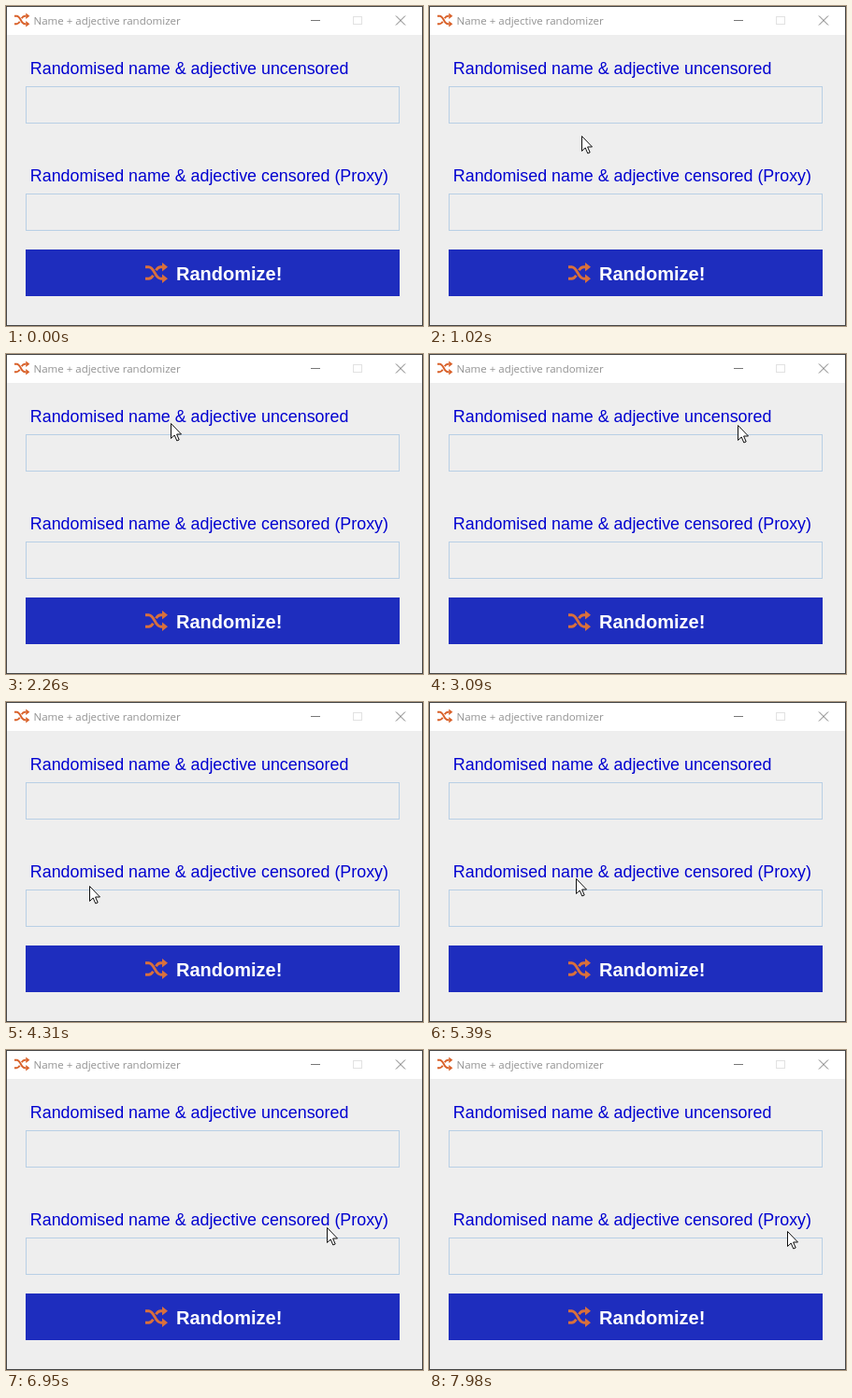
An HTML page for the animation above (8000 ms loop, 446 by 343 pixels).

```html
<!DOCTYPE html>
<html lang="en">
<head>
<meta charset="utf-8">
<title>Name + adjective randomizer</title>
<style>
  html, body { margin: 0; width: 100%; height: 100%; overflow: hidden; background: #eee; }
  svg { display: block; }
  .title { font: 11.5px "Open Sans", "Noto Sans", sans-serif; fill: #929292; }
  .label { font: 17.88px "Liberation Sans", Arial, sans-serif; fill: #0000d0; }
  .button { font: bold 20px "Liberation Sans", Arial, sans-serif; fill: #fff; }
  .field { fill: #eee; stroke: #b8cfe5; }
  .line { fill: none; stroke: #777; }
  .off { stroke: #e2e2e2; }
</style>
</head>
<body>
<svg width="446" height="343" viewBox="0 0 446 343">
  <defs>
    <g id="shuffle">
      <g fill="none" stroke="currentColor" stroke-width="2.9">
        <path d="M0 5H3.5C10 5 10 17.5 16.5 17.5H18"/>
        <path d="M0 17.5H3.5C5.8 17.5 7.2 16 8.4 14"/>
        <path d="M11.4 8.6C12.7 6.4 14.2 5 16.5 5H18"/>
      </g>
      <path fill="currentColor" d="M18 .3L24 5L18 9.7ZM18 12.8L24 17.5L18 22.2Z"/>
    </g>
  </defs>

  <rect width="446" height="343" fill="#eee"/>
  <rect width="446" height="31" fill="#fff"/>
  <use href="#shuffle" transform="translate(9 7.3) scale(.68)" color="#d9622b"/>
  <text class="title" x="29.5" y="20">Name + adjective randomizer</text>
  <path class="line" d="M326 15.5H336"/>
  <rect class="line off" x="371.5" y="11.5" width="9" height="8"/>
  <path class="line" d="M417 10.5L427 20.5M427 10.5L417 20.5"/>

  <text class="label" x="25.8" y="73">Randomised name &amp; adjective uncensored</text>
  <rect class="field" x="21.5" y="86.5" width="399" height="39"/>
  <text class="label" x="25.8" y="188">Randomised name &amp; adjective censored (Proxy)</text>
  <rect class="field" x="21.5" y="201.5" width="399" height="39"/>

  <rect x="21" y="261" width="400" height="50" fill="#1e2dbe"/>
  <use href="#shuffle" transform="translate(149 274.7)" color="#d9703c"/>
  <text class="button" x="182" y="294">Randomize!</text>

  <rect x=".5" y=".5" width="445" height="342" fill="none" stroke="#444"/>
  <path id="cursor" d="M.5 .5V16.5L4.2 13L6.8 19L9.2 18L6.6 12H11.5Z" fill="#fff" stroke="#111" visibility="hidden"/>
</svg>
<script>
  const LOOP = 8000;
  const cursor = document.getElementById("cursor");
  const mix = (a, b, k) => a + (b - a) * k;
  const mixPoint = (p, q, k) => p.map((v, i) => mix(v, q[i], k));

  const line = (a, b) => k => mixPoint(a, b, k);
  const bend = (a, c, b) => k => mixPoint(mixPoint(a, c, k), mixPoint(c, b, k), k);
  const ring = (cx, cy, rx, ry, from, to) => k => {
    const angle = mix(from, to, k);
    return [cx + rx * Math.cos(angle), cy + ry * Math.sin(angle)];
  };

  // The pointer rests at the end of each stroke until the next one starts.
  const strokes = [
    { start: 690, end: 1470, at: bend([350, 334], [84, 30], [32, 72]) },     // enter
    { start: 1630, end: 3250, at: bend([32, 72], [232, 74], [355, 77]) },    // underline first label
    { start: 3790, end: 4530, at: bend([355, 77], [95, 233], [36, 188]) },   // drop to second label
    { start: 4610, end: 5390, at: line([36, 188], [157, 189]) },
    { start: 5490, end: 6420, at: line([157, 189], [291, 190]) },
    { start: 6610, end: 7410, at: bend([291, 190], [356, 194], [402, 179]) },
    { start: 7430, end: 7980, at: ring(373.5, 182, 29, 13, -0.2, -5.06) }    // circle last word
  ];

  function draw(t) {
    const stroke = strokes.findLast(s => t >= s.start);
    cursor.setAttribute("visibility", stroke ? "visible" : "hidden");
    if (!stroke) return;
    const k = Math.min(1, (t - stroke.start) / (stroke.end - stroke.start));
    cursor.setAttribute("transform", `translate(${stroke.at(k).map(Math.round)})`);
  }

  let first;
  function tick(now) {
    first ??= now;
    draw((now - first) % LOOP);
    requestAnimationFrame(tick);
  }
  requestAnimationFrame(tick);
</script>
</body>
</html>
```
